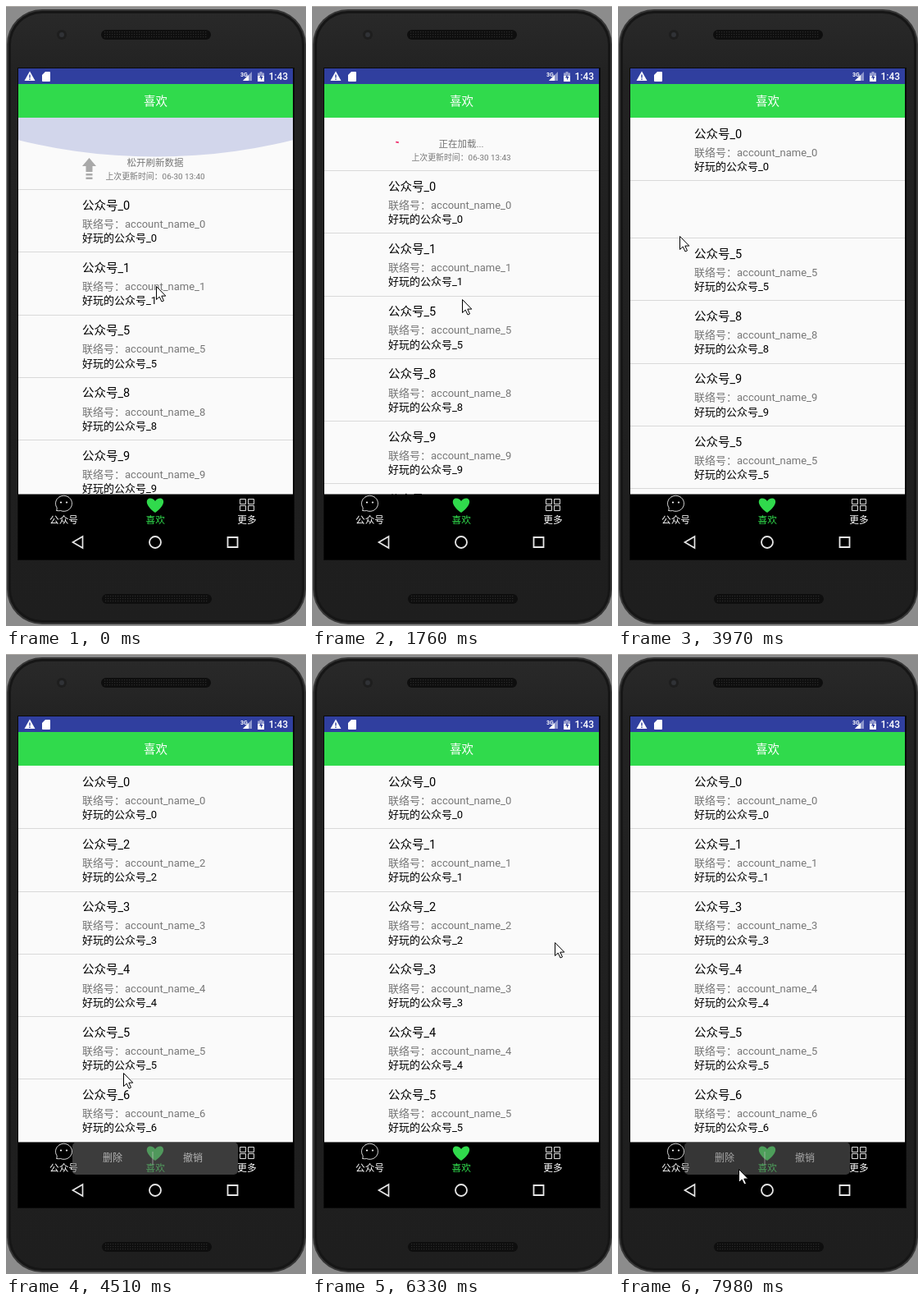
Write an HTML page with a canvas that moves like this. It is 366 by 755 pixels and loops after 8 s.

```html
<!DOCTYPE html>
<html lang="zh-CN">
<head>
<meta charset="utf-8">
<style>
html, body { margin: 0; width: 100%; height: 100%; overflow: hidden; background: #8c8c8c; }
canvas { display: block; }
</style>
</head>
<body>
<canvas width="366" height="755"></canvas>
<script>
const ctx = document.querySelector('canvas').getContext('2d');
const LOOP = 8000, STEP = 140, COLLAPSE = 400, FADE = 420;
const LEFT = 15, WIDTH = 335, TOP = 136, BOTTOM = 594.5, ROW = 76.25;
const GREEN = '#30da4c', PAPER = '#fafafa', LINE = '#d9d9d9';

// Spans in which the screen moves, in steps of about STEP ms
const spans = [[160, 620], [1760, 2180], [2610, 3120], [3400, 4390],
  [4510, 4810], [5340, 6330], [6610, 6730], [7040, 7980]];

// Pointer moves: start, end, then the place reached
const moves = [[160, 620, 183, 357], [2600, 2610, 246, 300], [2610, 3120, 291, 225],
  [3400, 3960, 75, 280], [4390, 4510, 143, 510], [4510, 4810, 205, 606], [5620, 6330, 296, 351],
  [6600, 6610, 308, 289], [6610, 6730, 269, 300], [7040, 7300, 75, 330], [7580, 7980, 147, 627]];

// A row is dragged from "grab", its gap closes from "drop", and "undo" brings it back
const swipes = [{ row: 1, grab: 3400, fromX: 291, drop: 3850, undo: 5760 },
  { row: 2, grab: 6610, fromX: 308, drop: 7170, undo: LOOP }];

const ramp = (t, a, b) => Math.min(1, Math.max(0, (t - a) / (b - a)));
const smooth = p => p * p * (3 - 2 * p);

function snap(t) {
  const [a, b] = spans.findLast(s => s[0] <= t) ?? [0, 0];
  if (t >= b) return b;
  const step = (b - a) / Math.round((b - a) / STEP);
  return a + Math.floor((t - a) / step) * step;
}

function pointerAt(t) {
  return moves.reduce(([x, y], [a, b, toX, toY]) => {
    const p = ramp(t, a, b);
    return [x + (toX - x) * p, y + (toY - y) * p];
  }, [183, 341]);
}

function rect(x, y, w, h, color, radius = 0) {
  ctx.fillStyle = color;
  ctx.beginPath();
  ctx.roundRect(x, y, w, h, radius);
  ctx.fill();
}

function circle(x, y, r, color) {
  rect(x - r, y - r, 2 * r, 2 * r, color, r);
}

function arc(x, y, r, from, to, color) {
  ctx.strokeStyle = color;
  ctx.lineWidth = 1.8;
  ctx.beginPath();
  ctx.arc(x, y, r, from, to);
  ctx.stroke();
}

function shape(path, x, y, fill, stroke, width = 1) {
  ctx.save();
  ctx.translate(x, y);
  const p = new Path2D(path);
  if (fill) { ctx.fillStyle = fill; ctx.fill(p); }
  if (stroke) { ctx.strokeStyle = stroke; ctx.lineWidth = width; ctx.stroke(p); }
  ctx.restore();
}

function text(str, x, y, size, color, align = 'left', weight = 400) {
  ctx.font = `${weight} ${size}px Roboto, "Noto Sans CJK SC", "Noto Sans CJK", sans-serif`;
  ctx.textAlign = align;
  ctx.fillStyle = color;
  ctx.fillText(str, x, Math.round(y + size * 0.37));
}

function speaker(x, y) {
  rect(x, y, 134, 12, '#0e0e0e', 6);
  for (let i = 0; i < 42; i++)
    for (let j = 0; j < 3; j++) rect(x + 4 + i * 3, y + 2 + j * 3, 1.3, 1.3, '#2a2a2a');
}

function drawPhone() {
  rect(0, 0, 366, 755, '#8c8c8c');
  rect(0, 0, 366, 1, '#b0aca8');
  rect(1, 4, 365, 749, '#363636', 43);
  rect(3, 6, 361, 745, '#161616', 41);
  const body = ctx.createLinearGradient(0, 8, 0, 750);
  body.addColorStop(0, '#292929');
  body.addColorStop(0.1, '#222');
  body.addColorStop(1, '#1e1e1e');
  rect(6, 9, 355, 739, body, 38);
  circle(68, 35, 6, '#1e1e1e');
  circle(68, 35, 3, '#303236');
  speaker(116, 29);
  speaker(117, 716);
  rect(14, 75, 338, 600, '#0a0a0a');
}

function drawStatusBar() {
  rect(LEFT, 76, WIDTH, 19, '#303f9f');
  shape('M0-6L6.5 5.5H-6.5Z', 29, 85.5, '#fff');
  rect(28.3, 83.5, 1.4, 4, '#303f9f');
  rect(28.3, 88.5, 1.4, 1.4, '#303f9f');
  shape('M4 0H9Q10 0 10 1V11Q10 12 9 12H1Q0 12 0 11V4Z', 44, 80, '#fff');
  text('3G', 286, 83, 7, '#fff', 'left', 700);
  shape('M11 0V11H0Z', 289, 80, '#8d96cc');
  shape('M7 4V11H0Z', 289, 80, '#fff');
  shape('M2.5 0H5.5V1.5H8V5H0V1.5H2.5Z', 307, 80, '#989fd0');
  rect(307, 85, 8, 7, '#fff');
  shape('M4.5 3L2 7.5H4V10.5L6.5 6H4.5Z', 307, 80, '#303f9f');
  text('1:43', 320.5, 86, 12, '#fff', 'left', 500);
}

function drawTabs() {
  rect(LEFT, BOTTOM, WIDTH + 1, 674 - BOTTOM, '#000');
  shape('M-8.5 8.5Q-5 9-3.5 8.5A10 9.5 0 1 0-8 4.8Q-7.5 7-8.5 8.5Z', 70, 606, null, '#ddd');
  for (const x of [67, 74]) circle(x, 604.5, 1.1, '#fff');
  shape('M0 9C-14-1-11-8.5-6-8.5Q-2-8.5 0-5Q2-8.5 6-8.5C11-8.5 14-1 0 9Z', 182, 608, GREEN);
  for (const x of [285.5, 295.5])
    for (const y of [600.5, 608.5]) shape('M0 0H7V6H0Z', x, y, null, '#ddd');
  ['公众号', '喜欢', '更多'].forEach((label, i) =>
    text(label, 70.5 + 111.7 * i, 625.5, 11.7, i === 1 ? GREEN : '#fff', 'center'));
  shape('M6-7V7L-6 0Z', 87.5, 653, null, '#e6e6e6', 1.7);
  arc(182, 653, 7, 0, 7, '#e6e6e6');
  shape('M0 0H12V12H0Z', 270.5, 647, null, '#e6e6e6', 1.8);
}

function drawHeader(y, t) {
  const loading = t >= 1760;
  if (loading) arc(101.5, y - 24, 10.5, -1.5, -1.15 + (t - 1760) / 150, '#f0306e');
  else shape('M0-38L8.5-28H4V-21H-4V-28H-8.5Z M-4-19H4V-16.5H-4Z M-4-14.5H4V-12H-4Z', 101.5, y, '#a9a9a9');
  text(loading ? '正在加载...' : '松开刷新数据', 182, y - 32.3, 11.5, '#777', 'center');
  text('上次更新时间：06-30 13:4' + (loading ? 3 : 0), 182, y - 15.5, 9.9, '#777', 'center');
  rect(LEFT, Math.round(y), WIDTH, 1, LINE);
}

function drawGlow(scale) {
  ctx.fillStyle = 'rgba(63, 81, 181, 0.21)';
  ctx.beginPath();
  ctx.ellipse(182.5, TOP - 435 * scale, 502, 502 * scale, 0, 0, 7);
  ctx.fill();
}

function drawRow(id, x, y) {
  text('公众号_' + id, x, y + 19.3, 14.5, '#000');
  text('联络号：account_name_' + id, x, y + 42, 13, '#777');
  text('好玩的公众号_' + id, x, y + 59.3, 13, '#000');
}

function rowIds(t) {
  if (t < swipes[0].drop + COLLAPSE) return [0, 1, 5, 8, 9, 5, 6];
  const removed = swipes.find(s => t >= s.drop + COLLAPSE && t < s.undo)?.row;
  return [0, 1, 2, 3, 4, 5, 6, 7].filter(id => id !== removed);
}

function drawList(t, pointerX) {
  const pulling = t < 1760, pull = ramp(t, 160, 620);
  const header = pulling ? 87 + 5 * pull : 64 * (1 - smooth(ramp(t, 1760, 2180)));
  const swipe = swipes.find(s => t >= s.grab && t < s.drop + COLLAPSE);

  ctx.save();
  ctx.beginPath();
  ctx.rect(LEFT, TOP, WIDTH, BOTTOM + 1 - TOP);
  ctx.clip();
  rect(LEFT, TOP, WIDTH, 460, PAPER);
  let y = TOP + header;
  if (header) drawHeader(y, t);
  rowIds(t).forEach((id, i) => {
    const swiped = i === swipe?.row;
    const dx = swiped ? pointerX - swipe.fromX : 0;
    ctx.globalAlpha = Math.max(0, 1 - 2 * Math.abs(dx) / WIDTH);
    drawRow(id, 93 + dx, y);
    ctx.globalAlpha = 1;
    y += swiped ? ROW * (1 - ramp(t, swipe.drop, swipe.drop + COLLAPSE) ** 2) : ROW;
    rect(LEFT, Math.round(y), WIDTH, 1, LINE);
  });
  if (pulling) drawGlow(0.71 - 0.4 * pull);
  ctx.restore();
}

function drawPopup(t) {
  for (const { drop, undo } of swipes) {
    const shown = drop + COLLAPSE;
    ctx.globalAlpha = ramp(t, shown, shown + FADE) * (1 - ramp(t, undo - 130, undo + 130));
    rect(81, 594.5, 202, 39.5, 'rgba(104, 104, 104, 0.93)', 5);
    text('删除', 130, 614, 12, '#fff', 'center');
    text('撤销', 228, 614, 12, '#fff', 'center');
    rect(178.5, 606, 1, 16, '#ccc');
  }
  ctx.globalAlpha = 1;
}

function draw(time) {
  const t = snap(time), [x, y] = pointerAt(t);
  drawPhone();
  drawStatusBar();
  rect(LEFT, 95, WIDTH, 41, GREEN);
  text('喜欢', 182.5, 115.7, 14.5, '#fff', 'center');
  drawList(t, x);
  drawTabs();
  drawPopup(t);
  shape('M0 0V16L3.7 12.6 6.5 18.5 9 17.4 6.3 11.6H11.3Z', Math.round(x) + 0.5, Math.round(y) + 0.5, '#fff', '#000');
}

const start = performance.now();
function tick() {
  draw((performance.now() - start) % LOOP);
  requestAnimationFrame(tick);
}
tick();
</script>
</body>
</html>
```
